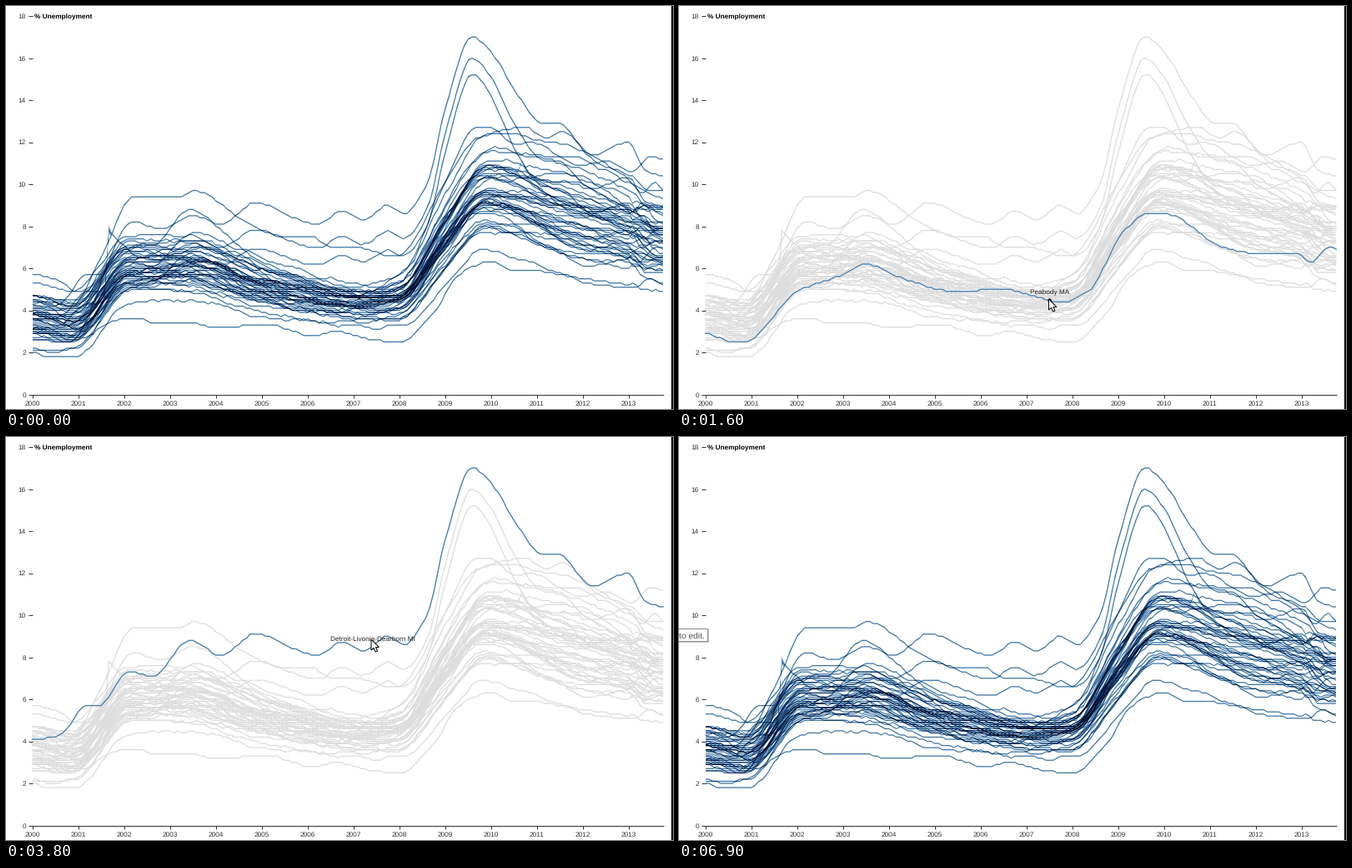
Animation, 800 px wide and 484 px high, one loop 7100 ms. Source, as a matplotlib script:

```python
import numpy as np
import matplotlib.pyplot as plt
from matplotlib.animation import FuncAnimation
from matplotlib.collections import LineCollection
from matplotlib.patches import Polygon, Rectangle

plt.rcParams["text.hinting"] = "none"

W, H, DPI = 800, 484, 100
PT = 72 / DPI
X0, YEAR = 31.5, 55.04
Y0, UNIT = 466.5, 25.25
STEEL = np.array([70, 130, 180]) / 255
STROKE = 1.3
FONT = 8.25

rng = np.random.default_rng(11)
t = np.arange(166) / 12          # years since 2000, monthly
names, rates = [], []


def px(year):
    return X0 + YEAR * year


def py(rate):
    return Y0 - UNIT * rate


def bump(center, width):
    return np.exp(-((t - center) / width) ** 2)


def curve(keys, at):
    """Smooth curve through (x, y) keys that never overshoots them."""
    x, y = np.array(keys, float).T
    step = np.diff(x)
    grade = np.diff(y) / step
    before, after = grade[:-1], grade[1:]
    same_way = before * after > 0
    slope = np.zeros_like(x)
    slope[1:-1][same_way] = (2 * before * after)[same_way] / (before + after)[same_way]
    k = np.clip(np.searchsorted(x, at, "right") - 1, 0, len(step) - 1)
    u = np.clip((at - x[k]) / step[k], 0, 1)
    rise = u * u * (3 - 2 * u)
    bend = u * (1 - u) * ((1 - u) * slope[k] - u * slope[k + 1])
    return y[k] + (y[k + 1] - y[k]) * rise + step[k] * bend


def add(name, series):
    names.append(name)
    rates.append(np.round(series, 1))


# Areas that stand out, as (years since 2000, rate) turning points
add("Bethesda-Rockville-Frederick MD", curve(
    [(0, 2.6), (.9, 2.6), (2, 3.6), (2.3, 3.6), (2.7, 3.4), (3.4, 3.4),
     (4, 3.2), (5.15, 3.3), (6.1, 2.8), (6.6, 3), (7.4, 2.6), (8, 2.5),
     (8.75, 3.9), (9.3, 5.7), (10, 6.3), (10.45, 5.9), (10.85, 5.9),
     (11.7, 5.6), (12, 5.3), (13.15, 5.1), (13.45, 5.5), (13.75, 5.2)], t))
add("Peabody MA", curve(
    [(0, 2.9), (.6, 2.5), (.85, 2.5), (2, 4.9), (3, 5.7), (3.5, 6.2),
     (4.2, 5.6), (5.45, 4.9), (6.5, 5), (7.45, 4.5), (7.8, 4.4), (8.35, 4.9),
     (9.1, 7.7), (9.65, 8.6), (10, 8.6), (11.3, 7), (12.1, 6.7), (12.9, 6.7),
     (13.2, 6.3), (13.6, 7), (13.75, 6.9)], t))
add("Lawrence-Methuen-Salem MA-NH", curve(
    [(0, 4.7), (.85, 4.2), (1.5, 6.5), (2.2, 9.4), (3.2, 9.4), (3.5, 9.7),
     (4.7, 8.15), (5.5, 7.5), (6.1, 7.5), (6.5, 7), (7.1, 7), (7.5, 6.75),
     (7.7, 6.6), (7.95, 6.6), (8.9, 9.7), (9.7, 12.7), (10, 12.7),
     (10.5, 11.9), (10.85, 12), (11.95, 10.9), (12.55, 11.1), (13.1, 10.6),
     (13.45, 11.3), (13.75, 11.2)], t))
add("Los Angeles-Long Beach-Glendale CA", curve(
    [(0, 5.7), (.5, 5.5), (1, 4.9), (2.3, 7), (2.8, 6.6), (3.55, 7.2),
     (4.05, 6.7), (4.35, 6.8), (5.6, 5), (6, 5.1), (6.8, 4.6), (8.1, 5.9),
     (9.05, 10.3), (9.7, 12.2), (10.75, 12.7), (11.2, 12.2), (11.55, 12.5),
     (12.2, 11.2), (12.9, 10.4), (13.3, 9.6), (13.55, 10.1), (13.75, 9.7)], t))
add("Haverhill-North Andover-Amesbury MA-NH", curve(
    [(0, 2.6), (.8, 2.5), (2.2, 8.2), (2.8, 7.9), (3.5, 8.5), (5, 6.3),
     (7.2, 4.9), (8, 5.1), (9.7, 10.4), (11.5, 9), (13.75, 7.8)], t))

detroit = curve(
    [(0, 4.1), (.6, 4.3), (1.2, 5.7), (1.45, 5.7), (2.1, 7.3), (2.6, 7.1),
     (3.45, 8.8), (4.1, 8.1), (4.85, 9.1), (6.2, 8.1), (6.75, 8.7),
     (7.2, 8.3), (7.75, 9), (8.1, 8.6), (8.6, 10), (9, 13.6), (9.58, 17),
     (10.1, 16), (10.5, 14.5), (11.15, 12.9), (11.45, 12.9), (12.2, 11.4),
     (13, 12), (13.35, 10.7), (13.75, 10.4)], t)
add("Detroit-Livonia-Dearborn MI", detroit)
add("Detroit-Warren-Livonia MI Met Area", detroit * (.86 + .08 * bump(9.6, .9)))
add("Warren-Troy-Farmington Hills MI", detroit * (.76 + .135 * bump(9.6, .9)))

AREAS = """Nashua NH-MA|Camden NJ|Wilmington DE-MD-NJ|Gary IN
Lake County-Kenosha County IL-WI|Chicago-Joliet-Naperville IL
Dallas-Plano-Irving TX|Fort Worth-Arlington TX|Edison-New Brunswick NJ
Newark-Union NJ-PA|Nassau-Suffolk NY|New York-White Plains-Wayne NY-NJ
Philadelphia PA|Oakland-Fremont-Hayward CA|Santa Ana-Anaheim-Irvine CA
San Francisco-San Mateo-Redwood City CA|Seattle-Bellevue-Everett WA
Tacoma WA|Miami-Miami Beach-Kendall FL|Fort Lauderdale-Pompano Beach FL
West Palm Beach-Boca Raton FL|Boston-Cambridge-Quincy MA
Brockton-Bridgewater-Easton MA|Framingham MA|Taunton-Norton-Raynham MA
Lowell-Billerica-Chelmsford MA-NH|Portland ME|Hartford CT|Danbury CT
Bridgeport CT|Stamford CT|New Haven CT|Waterbury CT|Worcester MA
Springfield MA|Providence RI|Manchester NH|Rochester NH|Trenton NJ
Atlantic City NJ|Vineland NJ|Baltimore MD|Washington DC
""".replace("\n", "|").strip("|").split("|")

# The other areas scatter around a common course, from low to high
center = curve([(0, 3.6), (.9, 3.35), (2.1, 6), (3.5, 6.1), (5, 5.1),
                (7.2, 4.3), (8, 4.5), (9, 7.4), (9.9, 9.6), (11.6, 8.6),
                (13, 7.8), (13.75, 7.3)], t)
spread = curve([(0, .72), (3.5, .75), (7.2, .48), (8, .58), (9, 1),
                (10, 1.3), (11.5, 1.35), (13.75, 1.1)], t)
SHOCKS = {22: (1.66, 2.7, .45), 30: (10.66, .7, .12)}  # year, jump, decay

for k, area in enumerate(rng.permutation(AREAS)):
    quantile = (k + .5) / len(AREAS)
    score = np.log(quantile / (1 - quantile)) / 2
    wander = curve(np.column_stack([np.arange(0, 15, 2), rng.normal(0, .4, 8)]), t)
    score = score + wander * (1 - (score / 2.5) ** 2)
    noise = np.convolve(rng.normal(0, .14, len(t) + 4), np.ones(5) / 5, "valid")
    series = center + spread * score + noise
    series += rng.normal(0, .3) * bump(13.35, .13) + rng.normal(0, .2) * bump(13.1, .07)
    if k in SHOCKS:
        year, jump, decay = SHOCKS[k]
        since = t - year
        series += np.where(since >= 0, jump * np.exp(-np.maximum(since, 0) / decay), 0)
    add(str(area), series)

xs = px(t)
ys = py(np.array(rates))


def multiplied_lines():
    """All lines in steel blue, blended by multiplication on white."""
    xc, yc = np.arange(W) + .5, np.arange(H)[:, None] + .5
    inside = (xc > xs[0]) & (xc < xs[-1])
    image = np.ones((H, W, 3))
    for line in ys:
        y = np.interp(xc, xs, line)
        slope = np.interp(xc, xs, np.gradient(line, xs))
        distance = np.abs(yc - y) / np.hypot(1, slope)
        cover = np.clip(STROKE / 2 + .5 - distance, 0, 1) * inside
        image *= 1 - cover[..., None] * (1 - STEEL * .92)
    return image


fig = plt.figure(figsize=(W / DPI, H / DPI), dpi=DPI, facecolor="white")
ax = fig.add_axes([0, 0, 1, 1])
ax.axis("off")

blue = ax.imshow(multiplied_lines(), extent=(0, W, H, 0), aspect="auto",
                 interpolation="nearest", zorder=0)
ax.set_xlim(0, W)
ax.set_ylim(H, 0)
grey = ax.add_collection(LineCollection(
    [np.column_stack([xs, y]) for y in ys], colors="#dddddd",
    linewidths=STROKE * PT, zorder=1), autolim=False)


def write(x, y, text, size=FONT, **style):
    style = {"color": "#333333", "zorder": 5, **style}
    return ax.text(x, y, text, fontsize=size * PT, family="Liberation Sans",
                   va="baseline", **style)


def rule(x, y):
    ax.plot(x, y, color="#333333", lw=PT, zorder=3, solid_capstyle="butt")


for rate in range(0, 19, 2):
    rule([26.5, 31.5], [py(rate)] * 2)
    write(24, py(rate) + 3, str(rate), ha="right")
for year in range(14):
    rule([px(year)] * 2, [Y0, Y0 + 4])
    write(px(year), 480, str(2000 + year), ha="center")
rule([31, 789], [Y0, Y0])
write(34, 15, "% Unemployment", weight="bold", color="black")
ax.add_patch(Rectangle((798, 0), 2, H, color="black", lw=0, zorder=9))

# Hover parts
focus, = ax.plot([], [], color=STEEL, lw=STROKE * PT, zorder=2)
dot, = ax.plot([], [], "o", color="black", ms=4.4 * PT, mew=0, zorder=4)
label = write(0, 0, "", ha="center", color="#222222")
ARROW = np.array([(0, 0), (0, 13), (3, 10.4), (5.2, 15), (7.5, 14),
                  (5.4, 9.5), (9.4, 9.5)])
arrow = ax.add_patch(Polygon(ARROW, fc="white", ec="black", lw=PT, zorder=8))
hover_parts = [grey, focus, dot, label, arrow]

# Browser tooltip peeking in from the left
tooltip = [
    ax.add_patch(Rectangle((-5, 231), 41, 16, fc="#c8c8c8", lw=0, zorder=6)),
    ax.add_patch(Rectangle((-5, 229.5), 39, 15.5, fc="white", ec="#8a8a8a",
                           lw=PT, zorder=6)),
    write(31, 241.5, "to edit.", size=10.2, ha="right", color="#575757", zorder=7),
]

# Cursor stops: ms, x, y
STOPS = np.array([
    (100, 788, 474), (400, 625, 420), (700, 441, 400.5), (900, 441, 399),
    (1600, 443.5, 352), (2600, 449, 298), (3800, 438, 243), (4100, 430, 215),
    (4500, 160, 146), (4700, 53, 140.5), (4800, 22, 150)])
ENTER, LEAVE, TOOLTIP = 100, 4900, 5800


def update(frame):
    ms = frame * 100
    hovering = ENTER <= ms < LEAVE
    blue.set_visible(not hovering)
    for part in hover_parts:
        part.set_visible(hovering)
    for part in tooltip:
        part.set_visible(ms >= TOOLTIP)
    if hovering:
        cx, cy = curve(STOPS[:, [0, 1]], ms), curve(STOPS[:, [0, 2]], ms)
        month = int(np.clip(round((cx - X0) / YEAR * 12), 0, len(t) - 1))
        nearest = int(np.argmin(np.abs(ys[:, month] - cy)))
        x, y = xs[month], ys[nearest, month]
        focus.set_data(xs, ys[nearest])
        dot.set_data([x], [y])
        label.set_text(names[nearest])
        label.set_position((x, y - 6.5))
        arrow.set_xy(ARROW + (cx, cy))
    return [blue, *hover_parts, *tooltip]


animation = FuncAnimation(fig, update, frames=71, interval=100,
                          repeat=True, repeat_delay=0, blit=False)
plt.show()
```
